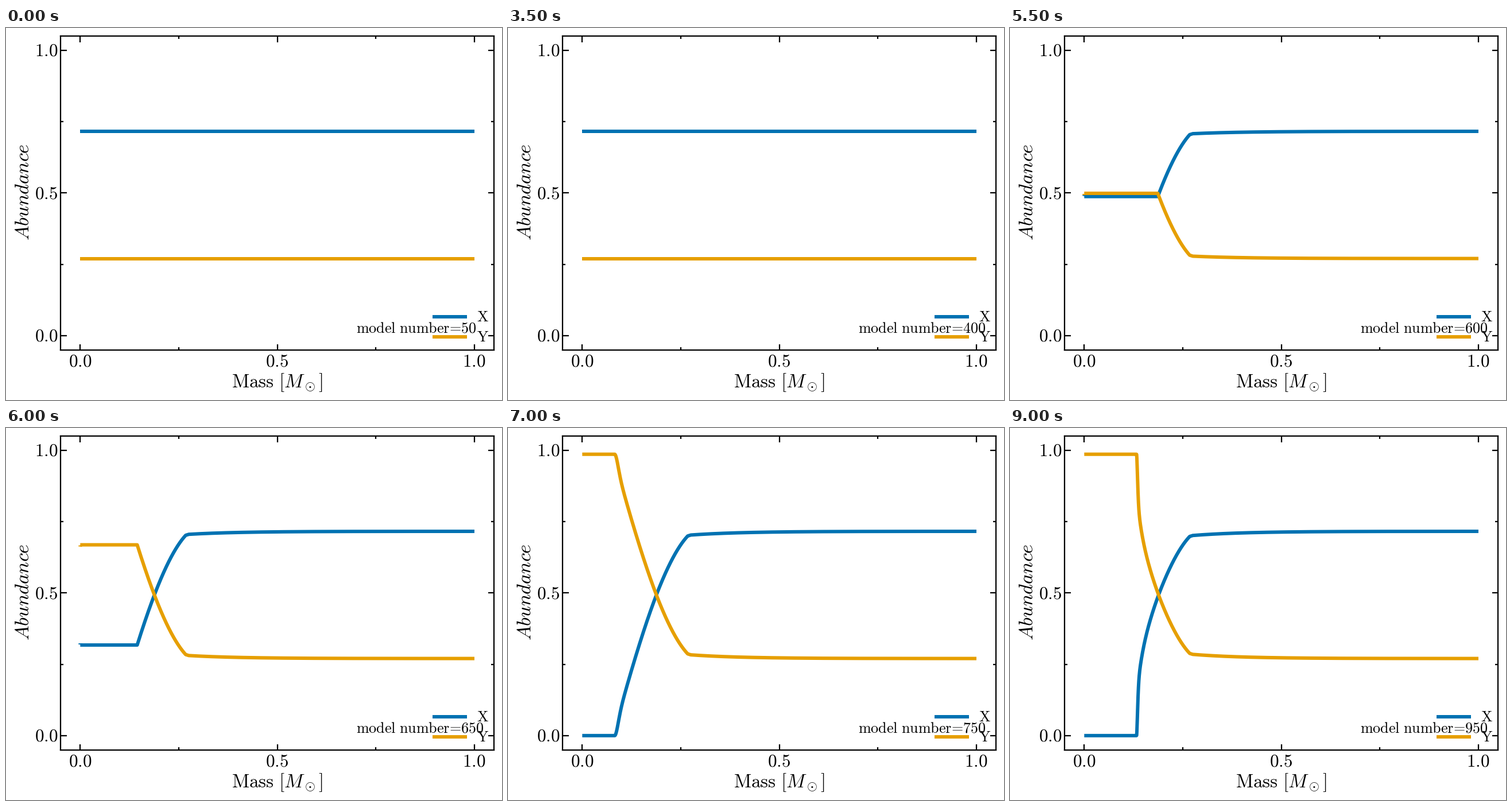
A matplotlib script that plays this animation: 864x648 px, repeating every 9500 ms.

```python
import numpy as np
import matplotlib.pyplot as plt
from matplotlib.animation import FuncAnimation

W, H = 864, 648
BLUE, ORANGE = "#0072B2", "#E69F00"
X0, TOTAL = 0.7156, 0.9856      # initial hydrogen, and X + Y everywhere
KNEE, ENVELOPE = 0.2677, 0.275  # end of the gradient, start of the envelope
FRAMES = 19

plt.rcParams["mathtext.fontset"] = "cm"
mass = np.linspace(0, 1, 2001)


def hydrogen(model):
    """Hydrogen profile as (mass, X) for one stellar model."""
    t = (model - 500) / 50      # burning becomes visible after model 500
    if t <= 0:
        return np.array([0, 1]), np.array([X0, X0])

    # envelope, slowly depleted just outside the knee
    drop = 0.015 * (1 - np.exp(-t / 2.5))
    outer = X0 - drop * np.exp(-(mass - ENVELOPE) / 0.13)

    # gradient left behind by the shrinking core
    u = KNEE - mass
    inner = 0.702 - 1.5 * u - 16 * u**2 + 23 * u**3
    inner += (0.0105 - drop) * np.clip(1 - u / 0.078, 0, 1)

    # core hydrogen runs out, then a thin shell burns outwards
    core = max(X0 - 0.0771 * t - 0.01856 * t**2, 0)
    if core == 0:
        s = t - 5
        edge = 0.1335 - 0.051 * 3**-s
        width = 0.012 * 0.78**s
        inner -= 0.108 * min(s / 2, 1) * np.exp(-(mass - 0.1351) / 0.0131)
        rise = 1.5 * np.maximum(mass - edge, 0) / width
        inner = np.maximum(inner, 0) * (1 - np.exp(-rise**1.5))
    inner = np.maximum(inner, core)

    keep = (mass <= KNEE) | (mass >= ENVELOPE)
    m, x = mass[keep], np.where(mass <= KNEE, inner, outer)[keep]
    if core > 0:
        # tiny upturn at the very centre
        m = np.concatenate([[0, 0, np.nan], m])
        x = np.concatenate([[core + 0.006, core + 0.002, np.nan], x])
    return m, x


fig = plt.figure(figsize=(12, 9), dpi=72, facecolor="white")
L, R, T, B = 95, 850.3, 13.7, 560.7
ax = fig.add_axes([L / W, 1 - B / H, (R - L) / W, (B - T) / H])
ax.set(xlim=(-0.05, 1.05), ylim=(-0.05, 1.05))
ax.spines[:].set_linewidth(2.25)
for axis in (ax.xaxis, ax.yaxis):
    axis.set_ticks([0, 0.5, 1])
    axis.set_ticks([0.25, 0.75], minor=True)
ax.tick_params(which="both", direction="in", top=True, right=True, width=2.25,
               labelbottom=False, labelleft=False)
ax.tick_params(which="major", length=10.5)
ax.tick_params(which="minor", length=5)


def label(x, y, text, size, **kw):
    """Text with its baseline at pixel (x, y), measured from the top left."""
    return fig.text(x / W, 1 - y / H, text, fontsize=size, va="baseline",
                    color="black", **kw)


for v in (0, 0.5, 1):
    text = rf"$\text{{{v:.1f}}}$"
    frac = (v + 0.05) / 1.1
    label(L + frac * (R - L) - 0.4, 589.7, text, 31, ha="center")
    label(90, B - frac * (B - T) + 9.8, text, 31, ha="right")

label(472, 626, r"$\mathrm{Mass\ }\text{[}M_\odot\text{]}$", 33, ha="center")
label(40.3, 285.3, "$Abundance$", 34.3, ha="center", rotation=90,
      rotation_mode="anchor")

style = dict(lw=6, solid_capstyle="butt", solid_joinstyle="round")
line_x, = ax.plot([], [], color=BLUE, **style)
line_y, = ax.plot([], [], color=ORANGE, **style)

for name, color, y in (("X", BLUE, 502.8), ("Y", ORANGE, 537.8)):
    fig.add_artist(plt.Line2D([743 / W, 803 / W], [1 - y / H] * 2,
                              color=color, **style))
    label(820.5, y + 8, rf"$\text{{{name}}}$", 26)

counter = label(609.5, 530.2, "", 26)


def update(i):
    model = 50 * (i + 1)
    m, x = hydrogen(model)
    line_x.set_data(m, x)
    line_y.set_data(m, TOTAL - x)
    counter.set_text(rf"$\mathrm{{model\ number}}\text{{={model}}}$")
    return line_x, line_y, counter


anim = FuncAnimation(fig, update, frames=FRAMES, interval=500, repeat=True,
                     repeat_delay=0)
plt.show()
```
